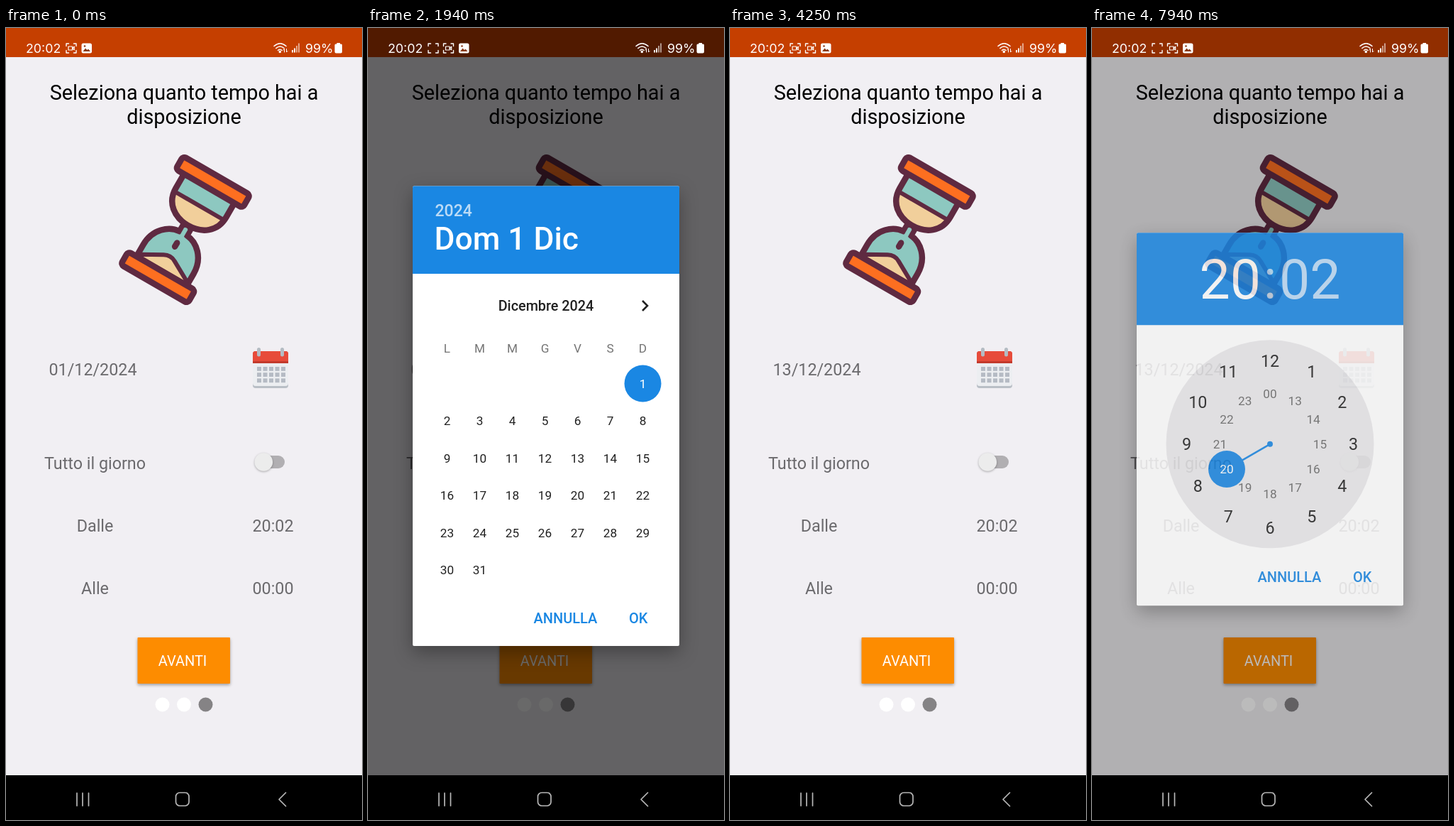
An HTML page for the animation above (8 s loop, 502 by 1115 pixels).

```html
<!DOCTYPE html>
<html lang="it">
<head>
<meta charset="utf-8">
<title>Selezione del tempo</title>
<style>
html, body { margin: 0; width: 100%; height: 100%; overflow: hidden; background: #f1eff3; }
svg { display: block; width: 100vw; height: 100vh; font-family: Roboto, sans-serif; }
.mid { text-anchor: middle; }
.bold { font-weight: 500; }
.line { fill: none; stroke-linecap: round; stroke-linejoin: round; }
.label { font-size: 23.3px; fill: #6b6a6d; text-anchor: middle; }
.status { font: 17.8px Inter, sans-serif; fill: #fff; }
.action { font-size: 20px; font-weight: 500; fill: #1a87e3; }
.panel { filter: drop-shadow(0 9px 13px rgba(0, 0, 0, .32)); }
</style>
</head>
<body>
<svg viewBox="0 0 502 1115">
  <defs>
    <path id="corners" class="line" stroke="#fff" stroke-width="1.4" d="M-7 -3V-6.5H-3.5M3.5 -6.5H7V-3M7 3V6.5H3.5M-3.5 6.5H-7V3"/>
    <path id="camera" class="line" stroke="#fff" stroke-width="1.2" d="M-4 -2.5H1.5V2.5H-4ZM1.5 0L4.2 -2.3V2.3Z"/>
  </defs>

  <rect width="502" height="1115" fill="#f1eff3"/>
  <rect width="502" height="41" fill="#c53f00"/>
  <g class="mid" font-size="28.8">
    <text x="251" y="101">Seleziona quanto tempo hai a</text>
    <text x="251" y="135">disposizione</text>
  </g>

  <g transform="translate(253 284) rotate(30)" class="line" stroke="#5f2a41" stroke-width="8.5">
    <path fill="#8dc8c0" d="M-41 70V48C-41 22 -22 7 -6 6V-8H6V6C22 7 41 22 41 48V70Z"/>
    <path fill="#f1cf9b" stroke-width="6" d="M-38 66V62L-9 46Q0 41 9 46L38 62V66Z"/>
    <path d="M-1 22V28"/>
    <path fill="#8dc8c0" stroke="none" d="M-41 -66H41V-38H-41Z"/>
    <path fill="#f1cf9b" stroke="none" d="M-41 -39H41C40 -18 22 -7 0 -7S-40 -18 -41 -39Z"/>
    <path stroke-width="6" d="M-40 -39H40"/>
    <path d="M-41 -66V-44C-41 -20 -22 -7 0 -7S41 -20 41 -44V-66"/>
    <path stroke="#8dc8c0" stroke-width="6" stroke-linecap="butt" d="M0 -2V12"/>
    <rect id="plate" x="-54.5" y="-88" width="109" height="21" rx="4.5" fill="#fd6f20"/>
    <use href="#plate" y="155"/>
  </g>

  <g>
    <rect x="348" y="458" width="50" height="49" rx="4" fill="#b9bfc6"/>
    <rect x="348" y="456" width="50" height="48" rx="4" fill="#eceef1"/>
    <path fill="#c23a2c" d="M348 472V459Q348 455 352 455H394Q398 455 398 459V472Z"/>
    <path fill="#e74b3a" d="M348 469V459Q348 455 352 455H394Q398 455 398 459V469Z"/>
    <path class="line" stroke="#b4bcc3" stroke-width="5" d="M356.5 452.500V460M389.500 452.500V460"/>
    <g id="grid" fill="#b5bbc4"></g>
  </g>

  <text id="date" class="label" x="122.500" y="489"></text>
  <text class="label" x="125.500" y="621">Tutto il giorno</text>
  <text class="label" x="125.500" y="709">Dalle</text>
  <text class="label" x="125.500" y="797">Alle</text>
  <text id="from" class="label" x="376.500" y="709"></text>
  <text id="to" class="label" x="376.500" y="797"></text>

  <circle id="halo" cx="380.500" cy="611"/>
  <rect id="track" x="360" y="602" width="33" height="18" rx="9"/>
  <circle id="thumb" cy="611" r="12.800" style="filter:drop-shadow(0 1px 1.500px rgba(0,0,0,.3))"/>

  <rect x="185.500" y="858" width="130.500" height="65" rx="1" fill="#fd8c00" style="filter:drop-shadow(0 2px 2px rgba(0,0,0,.35))"/>
  <text class="mid" x="249" y="898" font-size="20" fill="#fff">AVANTI</text>
  <circle cx="220.500" cy="952.500" r="10" fill="#fff"/>
  <circle cx="251" cy="952.500" r="10" fill="#fff"/>
  <circle cx="281.500" cy="952.500" r="10" fill="#858385"/>

  <rect id="dim" width="502" height="1052"/>

  <g id="dateDialog">
    <rect class="panel" x="63" y="222.500" width="376" height="647.500" rx="2" fill="#fff"/>
    <path fill="#1a87e3" d="M63 346V224.500Q63 222.500 65 222.500H437Q439 222.500 439 224.500V346Z"/>
    <text class="bold" x="94.500" y="265" font-size="23" fill="#fff" opacity=".7">2024</text>
    <text id="dayTitle" class="bold" x="93.500" y="312" font-size="44.300" fill="#fff"></text>
    <g id="month" class="mid" font-size="17.200" fill="#212121">
      <text class="bold" x="251" y="397.500" font-size="19.800">Dicembre 2024</text>
      <path fill="none" stroke="#212121" stroke-width="2.600" d="M387 384L394 391L387 398"/>
      <circle id="picked" r="26" fill="#1a87e3"/>
    </g>
    <text class="action" x="233.500" y="838">ANNULLA</text>
    <text class="action" x="368" y="838">OK</text>
  </g>

  <g id="timeDialog">
    <rect class="panel" x="63" y="285" width="376" height="525" rx="2" fill="#fff"/>
    <path fill="#1a87e3" d="M63 415V287Q63 285 65 285H437Q439 285 439 287V415Z"/>
    <g font-size="77" fill="#fff">
      <text x="238" y="378" text-anchor="end">20</text>
      <text class="mid" x="251" y="378" opacity=".7">:</text>
      <text x="264" y="378" opacity=".7">02</text>
    </g>
    <g id="clock" class="mid" transform="translate(251 582.500)">
      <circle r="146.500" fill="#eae9eb"/>
      <path stroke="#1a87e3" stroke-width="2.500" d="M0 0L-61 35.250"/>
      <circle r="4" fill="#1a87e3"/>
      <circle cx="-61" cy="35.250" r="26" fill="#1a87e3"/>
    </g>
    <text class="action" x="233.500" y="777">ANNULLA</text>
    <text class="action" x="368" y="777">OK</text>
  </g>

  <text class="status" x="28" y="34.500">20:02</text>
  <g id="newIcon"><use href="#corners"/><use id="blink" href="#camera"/></g>
  <g id="oldIcons">
    <g transform="translate(92 28.500)"><use href="#corners"/><use href="#camera"/></g>
    <rect x="106.500" y="21.500" width="14.500" height="14" rx="2.500" fill="#fff"/>
    <path fill="#8a3a18" d="M108.500 33L112 28.500L114.500 31L116 29.500L119 33Z"/>
    <circle cx="111" cy="25.500" r="1.300" fill="#8a3a18"/>
  </g>
  <g class="line" stroke="#fff" stroke-width="1.600">
    <path d="M378 25.500Q386.500 18 395 25.500M380.800 28.500Q386.500 23.500 392 28.500M383.500 31.500Q386.500 29 389 31.500"/>
    <path stroke-width="1" d="M392.500 34V29.500L391 31M395.500 29.500V34L397 32.500"/>
    <circle cx="386.300" cy="33.500" r="1" fill="#fff"/>
    <path stroke-width="2" stroke-linecap="butt" d="M404 34.500V31M407 34.500V28.500"/>
    <path stroke-width="2" stroke-linecap="butt" opacity=".55" d="M410 34.500V25M413 34.500V21.500"/>
  </g>
  <text class="status" x="461.500" y="34.500" text-anchor="end">99%</text>
  <path fill="#fff" d="M466.500 21H471V22.500H472.500Q474 22.500 474 24V33.500Q474 35.500 472 35.500H465.500Q463.500 35.500 463.500 33.500V24Q463.500 22.500 465 22.500H466.500Z"/>

  <rect y="1052" width="502" height="63"/>
  <g class="line" stroke="#b8b8b8" stroke-width="1.700">
    <path d="M100 1077V1095M108 1077V1095M116.500 1077V1095"/>
    <rect x="239.500" y="1076.500" width="18.500" height="18.500" rx="5.500"/>
    <path d="M394.500 1076.500L385 1086L394.500 1095.500"/>
  </g>
  <circle id="touch" r="11.500" fill="#fff" fill-opacity=".5" stroke="#8fb9e0" stroke-width="1.300"/>
</svg>

<script>
const LOOP = 8000;
const $ = id => document.getElementById(id);
const set = (id, attrs) => { for (const k in attrs) $(id).setAttribute(k, attrs[k]); };
const ramp = (t, start, length) => Math.min(1, Math.max(0, (t - start) / length));
const smooth = x => x * x * (3 - 2 * x);

function add(parent, tag, attrs, text = '') {
  const el = document.createElementNS('http://www.w3.org/2000/svg', tag);
  for (const k in attrs) el.setAttribute(k, attrs[k]);
  el.textContent = text;
  return $(parent).appendChild(el);
}

for (let i = 0; i < 15; i++)
  add('grid', 'rect', { x: 354 + i % 5 * 8.5, y: 477 + Math.floor(i / 5) * 8.2, width: 6, height: 5.8 });

// Month: Sunday the 1st sits in the last column of the first row.
const column = i => 111.5 + 46 * i;
const dayPos = d => ({ x: column((d + 5) % 7), y: 500.5 + 52.5 * Math.floor((d + 5) / 7) });
[...'LMMGVSD'].forEach((c, i) => add('month', 'text', { x: column(i), y: 456.5, fill: '#757575' }, c));
const days = [];
for (let d = 1; d <= 31; d++) {
  const p = dayPos(d);
  days[d] = add('month', 'text', { x: p.x, y: p.y + 6 }, d);
}

for (let h = 1; h <= 24; h++) {
  const inner = h > 12, r = inner ? 70.5 : 117.5, a = h * Math.PI / 6;
  add('clock', 'text', {
    x: r * Math.sin(a), y: -r * Math.cos(a) + (inner ? 6 : 8.2),
    'font-size': inner ? 17.2 : 23.3,
    fill: h === 20 ? '#fff' : inner ? '#6a6a6a' : '#212121'
  }, h === 24 ? '00' : h);
}

// Taps: start, end, x, y
const taps = [
  [1380, 1560, 373, 478], [2940, 3090, 299, 606], [3940, 4200, 399, 825],
  [5250, 5600, 381, 608], [6560, 6760, 381, 608], [7440, 7620, 376, 701]
];

// Fades a dialog in and out and returns its share of the dimming.
function dialog(id, t, open, close) {
  const a = ramp(t, open, 180), b = ramp(t, close, 180), late = (1 - a) ** 3;
  set(id, {
    opacity: (1 - late) * (1 - b ** 1.15),
    transform: `translate(0 ${20 * late - 10 * b})`
  });
  return a - b;
}

function status(t) {
  const p = smooth(ramp(t, 130, 310));
  set('oldIcons', { transform: `translate(${21.5 * p} 0)` });
  set('newIcon', { opacity: p, transform: `translate(92 28.5) scale(${p})` });
  set('blink', { opacity: Math.floor((t - 690) / 490) % 2 ? 1 : 0 });
}

function toggle(t) {
  const on = t >= 5450 && t < 6750;
  const p = smooth(ramp(t, 5450, 130)) - smooth(ramp(t, 6750, 130));
  const mix = (a, b) => `rgb(${a.map((v, i) => v + (b[i] - v) * p)})`;
  const [start, fade] = t < 6300 ? [5260, 5600] : [6560, 6850];
  set('halo', { r: 25 * smooth(ramp(t, start, 180)), opacity: .12 * (1 - ramp(t, fade, 210)) });
  set('track', { fill: mix([177, 175, 178], [136, 183, 231]) });
  set('thumb', { cx: 363.3 + 16 * p, fill: mix([236, 236, 236], [26, 135, 227]) });
  $('from').textContent = on ? '00:00' : '20:02';
  $('to').textContent = on ? '23:59' : '00:00';
  for (const id of ['from', 'to']) set(id, { opacity: on ? .28 : 1 });
}

function draw(t) {
  status(t);
  toggle(t);
  $('date').textContent = t < 4060 ? '01/12/2024' : '13/12/2024';

  const day = t < 3070 ? 1 : 13, p = dayPos(day);
  $('dayTitle').textContent = day === 1 ? 'Dom 1 Dic' : 'Ven 13 Dic';
  set('picked', { cx: p.x, cy: p.y });
  days[1].setAttribute('fill', day === 1 ? '#fff' : '#1a87e3');
  days[13].setAttribute('fill', day === 13 ? '#fff' : '#212121');
  set('month', { opacity: Math.min(1, 1.4 * ramp(t, 1680, 180)) });

  const shade = dialog('dateDialog', t, 1680, 4060) + dialog('timeDialog', t, 7860, LOOP);
  set('dim', { opacity: .59 * shade });

  const tap = taps.find(([a, b]) => t >= a && t < b);
  set('touch', tap ? { cx: tap[2], cy: tap[3], opacity: 1 - ramp(t, tap[1] - 60, 60) } : { opacity: 0 });
}

function frame() {
  draw(performance.now() % LOOP);
  requestAnimationFrame(frame);
}
frame();
</script>
</body>
</html>
```
